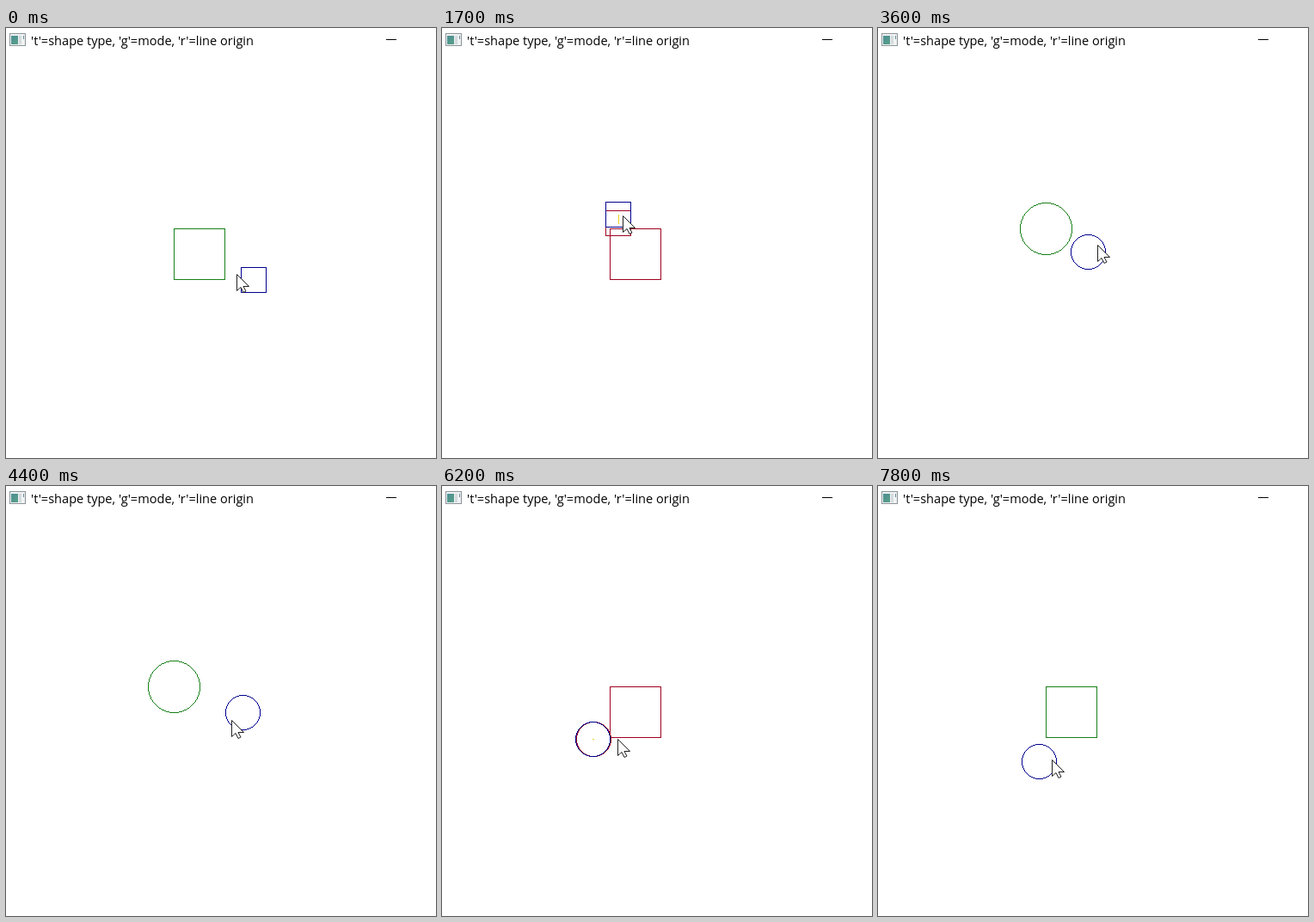
An HTML page with a canvas that plays this animation: 500 by 500 pixels, repeating every 7.9 s.

```html
<!DOCTYPE html>
<html lang="en">
<head>
<meta charset="utf-8">
<title>Shape collision</title>
<style>
html, body { margin: 0; width: 100%; height: 100%; overflow: hidden; background: #fff; }
canvas { display: block; }
</style>
</head>
<body>
<canvas id="stage" width="500" height="500"></canvas>
<script>
const ctx = document.getElementById('stage').getContext('2d');
const STEP = 100, STEPS = 79;
const CIRCLES_FROM = 34, MIXED_FROM = 59;
const BLUE = '#000090', RED = '#a00020', GREEN = '#188018', YELLOW = '#ecd020';
const HALF = 15, SMALL_R = 20, BIG_R = 30;
const box = { x: 195, y: 233, size: 60 };

// Turning points of the mouse: step, x, y
const path = [
  [0, 288, 293], [1, 268, 286], [4, 247, 259], [8, 278, 286], [11, 238, 262],
  [14, 200, 257], [17, 205, 227], [18, 210, 218], [24, 282, 270], [28, 245, 310],
  [29, 234, 310], [32, 202, 290], [38, 261, 244], [40, 226, 221], [43, 280, 246],
  [44, 275, 263], [45, 262, 272], [50, 216, 237], [53, 195, 206], [55, 178, 211],
  [56, 170, 215], [62, 176, 294], [63, 204, 294], [67, 240, 268], [70, 236, 240],
  [75, 168, 262], [78, 187, 320], [79, 202, 318]
];

// Cubic Hermite curve through the turning points
function mouseAt(s) {
  let i = 0;
  while (i < path.length - 2 && path[i + 1][0] <= s) i++;
  const a = path[i], b = path[i + 1];
  const before = path[Math.max(i - 1, 0)], after = path[Math.min(i + 2, path.length - 1)];
  const span = b[0] - a[0], u = (s - a[0]) / span;
  const [x, y] = [1, 2].map(k => {
    const ma = (b[k] - before[k]) / (b[0] - before[0]) * span;
    const mb = (after[k] - a[k]) / (after[0] - a[0]) * span;
    const d = b[k] - a[k];
    return Math.round(a[k] + u * (ma + u * (3 * d - 2 * ma - mb + u * (ma + mb - 2 * d))));
  });
  return { x, y };
}

// Moves p to the given distance from q, or returns null when it is farther away
function pushFrom(p, q, dist) {
  const dx = p.x - q.x, dy = p.y - q.y, d = Math.hypot(dx, dy);
  if (d >= dist || !d) return null;
  return { x: Math.round(q.x + dx * dist / d), y: Math.round(q.y + dy * dist / d) };
}

// Pushes a shape of half width h out of the box by the shortest way;
// the left and top edges keep a gap of one pixel
function pushFromBox(p, h) {
  const left = p.x + h - box.x + 1, right = box.x + box.size - p.x + h;
  const top = p.y + h - box.y + 1, bottom = box.y + box.size - p.y + h;
  const least = Math.min(left, right, top, bottom);
  if (least <= 0) return null;
  if (least === left) return { x: p.x - left, y: p.y };
  if (least === right) return { x: p.x + right, y: p.y };
  if (least === top) return { x: p.x, y: p.y - top };
  return { x: p.x, y: p.y + bottom };
}

function circleFromBox(p) {
  const clamp = (v, lo) => Math.max(lo, Math.min(lo + box.size, v));
  const near = { x: clamp(p.x, box.x), y: clamp(p.y, box.y) };
  const inside = near.x === p.x && near.y === p.y;
  return inside ? pushFromBox(p, SMALL_R) : pushFrom(p, near, SMALL_R);
}

function rect(x, y, w, h, color) {
  ctx.fillStyle = color;
  ctx.fillRect(x, y, w, h);
}

function square(x, y, size, color) {
  ctx.strokeStyle = color;
  ctx.strokeRect(x + 0.5, y + 0.5, size - 1, size - 1);
}

// Circles and lines are plotted pixel by pixel to stay crisp
function circle({ x, y }, r, color) {
  for (let a = 0; a <= r * 0.7072 + 0.5; a++) {
    const b = Math.round(Math.sqrt(r * r - a * a));
    for (const sx of [-1, 1]) for (const sy of [-1, 1]) {
      rect(x + sx * a, y + sy * b, 1, 1, color);
      rect(x + sx * b, y + sy * a, 1, 1, color);
    }
  }
}

function line(p, q, color) {
  const dx = q.x - p.x, dy = q.y - p.y;
  const n = Math.max(Math.abs(dx), Math.abs(dy), 1);
  for (let i = 0; i <= n; i++)
    rect(Math.round(p.x + dx * i / n), Math.round(p.y + dy * i / n), 1, 1, color);
}

function titleBar() {
  const teal = ctx.createLinearGradient(6, 9, 14, 19);
  teal.addColorStop(0, '#4c8f94');
  teal.addColorStop(1, '#5aa088');
  rect(4, 6, 19, 15, '#8c9499');
  rect(5, 7, 17, 13, '#f0f2f3');
  rect(6, 9, 8, 10, teal);
  rect(15, 9, 3, 10, '#d3dadd');
  rect(20, 9, 1, 4, '#6d8c96');
  rect(442, 13, 12, 1, '#000');
  ctx.font = '14.56px "Open Sans", "Noto Sans", sans-serif';
  ctx.fillText("'t'=shape type, 'g'=mode, 'r'=line origin", 29, 20);
}

const arrow = new Path2D('M.5 .5V19.5L5 15.5L8 21.5L11 20L8 14.5H14.5Z');
function cursor({ x, y }) {
  ctx.save();
  ctx.translate(x, y);
  ctx.fillStyle = '#fff';
  ctx.strokeStyle = '#202020';
  ctx.fill(arrow);
  ctx.stroke(arrow);
  ctx.restore();
}

function draw(s) {
  const mouse = mouseAt(s);
  const bigRound = s >= CIRCLES_FROM && s < MIXED_FROM;
  const smallRound = s >= CIRCLES_FROM;
  const hit = bigRound ? pushFrom(mouse, box, BIG_R + SMALL_R)
    : smallRound ? circleFromBox(mouse) : pushFromBox(mouse, HALF);
  const small = (p, color) => smallRound ? circle(p, SMALL_R, color)
    : square(p.x - HALF, p.y - HALF, 2 * HALF, color);

  rect(0, 0, 500, 500, '#fff');
  titleBar();
  const bigColor = hit ? RED : GREEN;
  if (bigRound) circle(box, BIG_R, bigColor);
  else square(box.x, box.y, box.size, bigColor);
  if (hit) {
    small(mouse, RED);
    line(mouse, hit, YELLOW);
  }
  small(hit || mouse, BLUE);
  // The pointer runs one step ahead of the shape
  cursor(mouseAt(s + 1));
}

const start = performance.now();
function tick() {
  draw(Math.floor((performance.now() - start) / STEP) % STEPS);
  requestAnimationFrame(tick);
}
tick();
</script>
</body>
</html>
```
